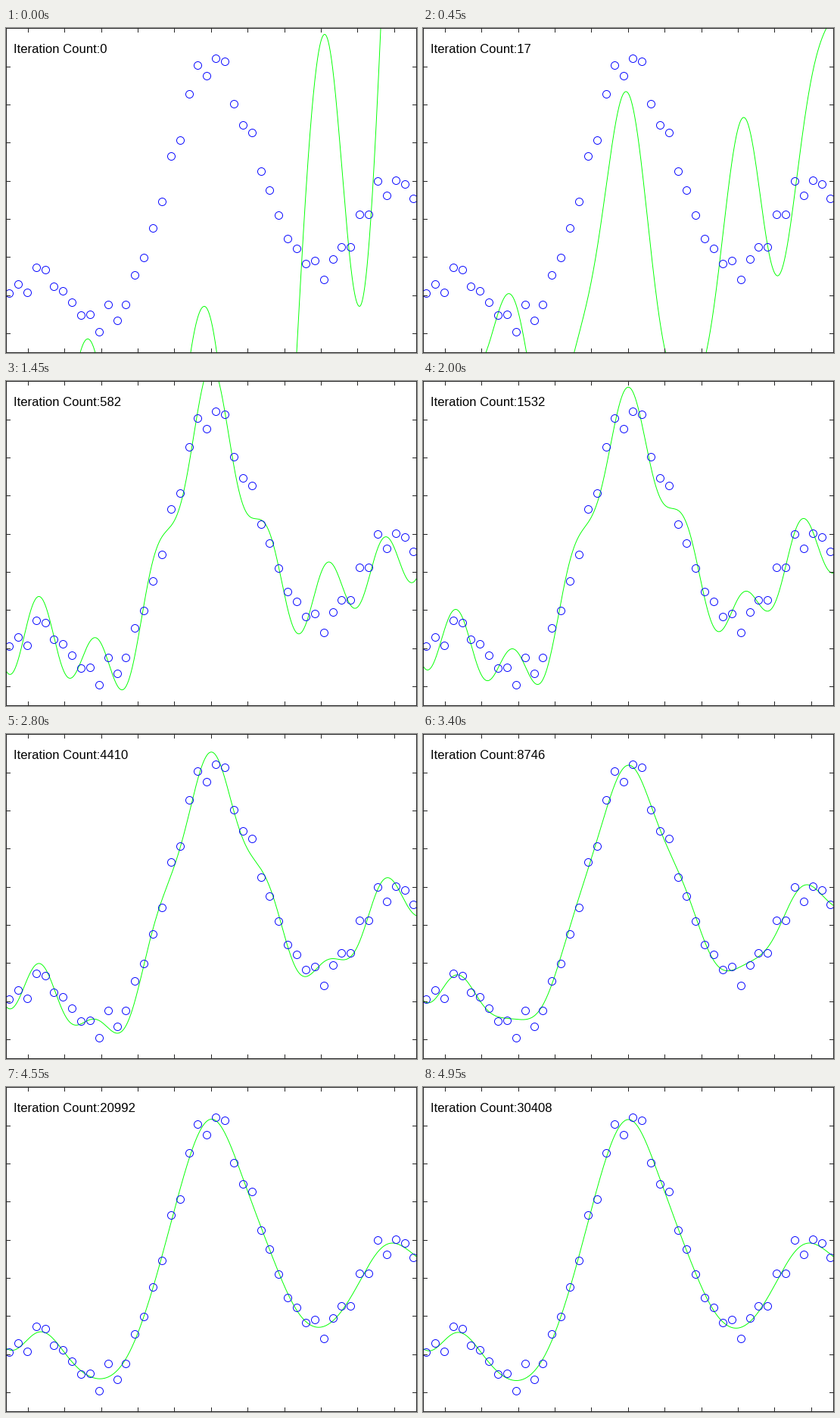
A matplotlib script for the animation above (5000 ms loop, 543 by 429 pixels).

```python
import numpy as np
import matplotlib.pyplot as plt
from matplotlib.animation import FuncAnimation
from matplotlib.collections import LineCollection

W, H, DPI = 543, 429, 64
FRAMES, INTERVAL = 100, 50
PX = 72 / DPI  # points per pixel
INK = "#262626"
GRID = np.linspace(0, W, 1087)
MID = W / 2

SAMPLES = np.array([
    350.5, 338, 349, 316.5, 319, 341, 347, 362, 379.5, 378.5, 401, 365.5,
    386, 365, 326, 303, 264, 229, 169.5, 148.5, 87, 49, 63, 40.5, 44.5,
    100.5, 128, 138.5, 189, 214, 247.5, 278, 291.5, 311, 307, 332, 305,
    289.5, 289, 246, 246, 202, 221.5, 201, 206, 225])
SAMPLE_X = 4.1 + 11.875 * np.arange(len(SAMPLES))

# Evenly spaced radial basis functions; the finest ripple they can carry
# alternates from one centre to the next.
CENTRES, SPACING = np.linspace(SAMPLE_X[0], SAMPLE_X[-1], 15, retstep=True)


def basis(x):
    return np.exp(-((x[:, None] - CENTRES) / SPACING) ** 2)


def least_squares(ridge=0.03):
    phi, mean = basis(SAMPLE_X), SAMPLES.mean()
    weights = np.linalg.solve(phi.T @ phi + ridge * np.eye(len(CENTRES)),
                              phi.T @ (SAMPLES - mean))
    return mean + basis(GRID) @ weights


def wave(xs, ys):
    """Join neighbouring peaks and troughs with half cosines."""
    i = np.searchsorted(xs, GRID, side="right") - 1
    xs, ys = np.array(xs), np.array(ys)
    u = (GRID - xs[i]) / (xs[i + 1] - xs[i])
    return ys[i] + (ys[i + 1] - ys[i]) * (1 - np.cos(np.pi * u)) / 2


best = least_squares()
ripple = -45 * np.cos(np.pi * (GRID - MID) / SPACING)
swell = -105 * GRID / 425 * np.cos(2 * np.pi * (GRID - 425) / 160)
start = wave([-40, 36, 108, 184, 262, 341, 421, 467, 535, 575],
             [400, 800, 410, 850, 367, 960, 8, 367, -640, 0])
offset = start - best - ripple - swell

# Sample-by-sample training makes the fit shiver.
rng = np.random.default_rng(4)
shiver = 3 * rng.normal(size=(FRAMES, len(CENTRES))) @ basis(GRID).T


def count_at(n):
    stages = [0, 18, 40, 56, 68, 82, 99]
    reached = [0, 138, 1532, 4410, 8746, 12987, 30408]
    return max(n, round(np.interp(n, stages, np.cbrt(reached)) ** 3))


def fit_at(n):
    """Coarse errors die out quickly, the fine ripple last."""
    count = count_at(n)
    y = (best + ripple * np.exp(-count / 4500) + swell * np.exp(-count / 500)
         + offset * max(0, 1 - n / 18) ** 1.6
         + shiver[n] * np.sin(np.pi * n / (FRAMES - 1)))
    return np.where(np.abs(y - H / 2) < H / 2 + 40, y + 0.4, np.nan)


fig = plt.figure(figsize=(W / DPI, H / DPI), dpi=DPI, facecolor="white")
ax = fig.add_axes([0, 0, 1, 1])
ax.set_xlim(0, W)
ax.set_ylim(H, 0)
ax.axis("off")

right, bottom = W - 0.5, H - 0.5
frame = [[(0.5, 0.5), (right, 0.5), (right, bottom), (0.5, bottom), (0.5, 0.5)]]
for k in range(11):
    x = np.floor(29.3 + 48.4 * k) + 0.5
    frame += [[(x, 0), (x, 6)], [(x, H - 6), (x, H)]]
for k in range(8):
    y = np.floor(51.2 + 50.35 * k) + 0.5
    frame += [[(0, y), (6, y)], [(W - 6, y), (W, y)]]

fit, = ax.plot([], [], color="#00ff00", lw=0.95 * PX, zorder=2)
ax.plot(SAMPLE_X, SAMPLES - 0.4, "o", ms=10 * PX, mfc="none", mec="#0000ff",
        mew=0.95 * PX, zorder=3)
ax.add_collection(LineCollection(frame, colors=INK, linewidths=PX,
                                 snap=False, zorder=4))
label = ax.text(10.3, 33, "", family=["Liberation Sans"], size=16.67 * PX,
                color="black", ha="left", va="baseline", zorder=5)


def update(n):
    fit.set_data(GRID, fit_at(n))
    label.set_text(f"Iteration Count:{count_at(n)}")
    return fit, label


anim = FuncAnimation(fig, update, frames=FRAMES, interval=INTERVAL,
                     init_func=lambda: update(0), repeat=True, repeat_delay=0)
plt.show()
```
